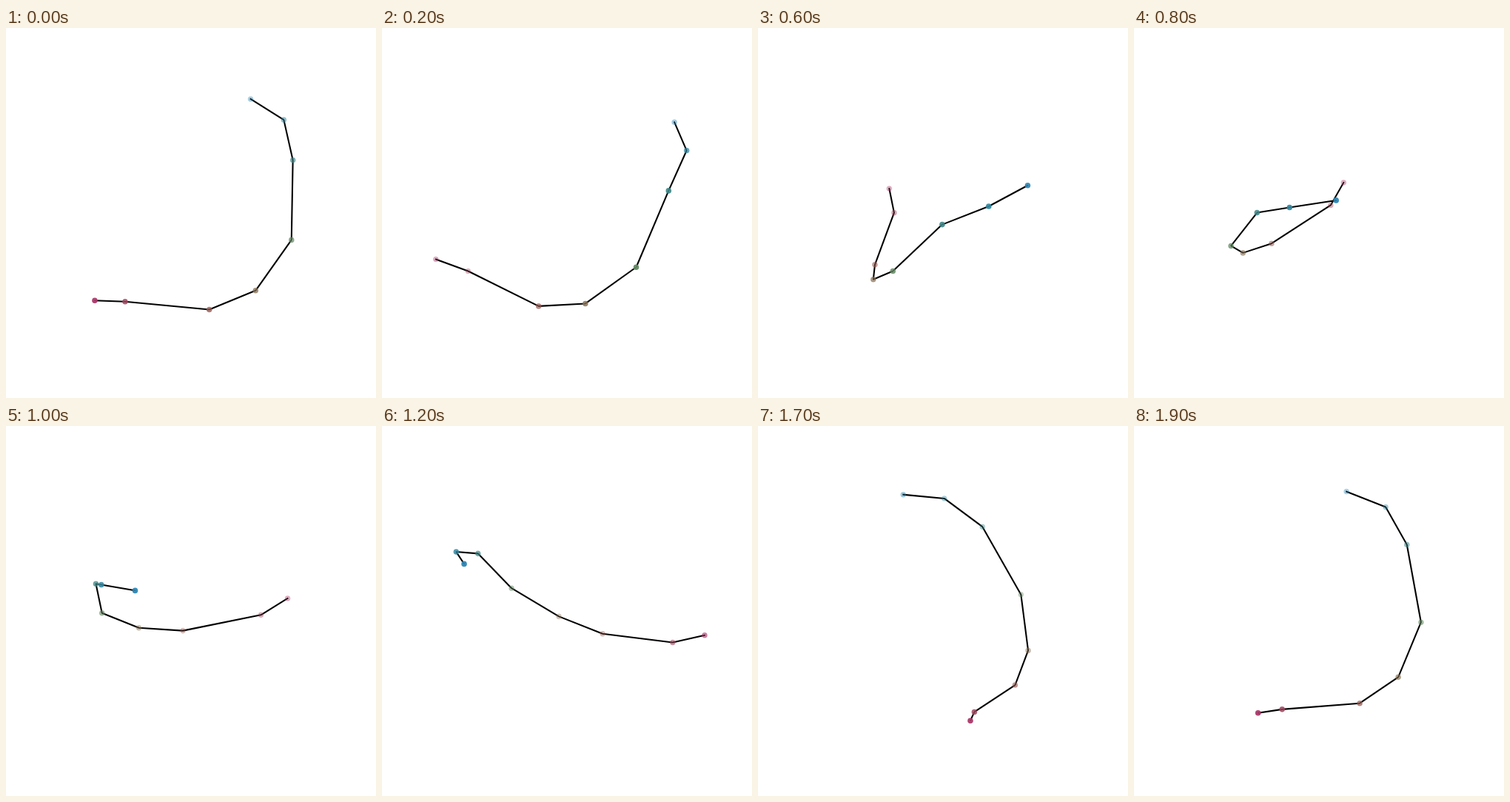
These frames come from a looping animation (500 px wide and 500 px high, 2 s). An HTML page with a canvas:

```html
<!DOCTYPE html>
<html lang="en">
<head>
<meta charset="utf-8">
<title>Rotating chain</title>
<style>
  html, body { margin: 0; width: 100%; height: 100%; overflow: hidden; background: #fff; }
  canvas { display: block; width: 500px; height: 500px; }
</style>
</head>
<body>
<canvas id="stage"></canvas>
<script>
const STEPS = 20, STEP_MS = 100;
const CENTER = { x: 256.25, y: 243.25 };
const EYE_DISTANCE = 2450;
const ELEVATION = Math.PI / 6;
const LINE_WIDTH = 2.08, DOT_RADIUS = 3.1, DOT_EDGE = 1.39;

// Chain nodes: distance toward the viewer, to the right, and up.
const nodes = [
  { front: 131.7, right: -131.7, up: -63.4, color: '#ac386a' },
  { front: 110.8, right: -93.1, up: -78.7, color: '#a04860' },
  { front: 100, right: 18.2, up: -98.4, color: '#9a5c55' },
  { front: 79.4, right: 80.1, up: -81.5, color: '#8a7458' },
  { front: 33.3, right: 128.8, up: -30.3, color: '#648962' },
  { front: -35.5, right: 131.6, up: 54.3, color: '#408788' },
  { front: -93.7, right: 121, up: 85.6, color: '#3388a0' },
  { front: -131.7, right: 76.3, up: 98.5, color: '#2e86b4' }
];

const canvas = document.getElementById('stage');
const ctx = canvas.getContext('2d');
const ratio = window.devicePixelRatio || 1;
canvas.width = canvas.height = 500 * ratio;
ctx.scale(ratio, ratio);
ctx.lineJoin = 'round';
ctx.lineCap = 'square';

function project(node, angle) {
  const cos = Math.cos(angle), sin = Math.sin(angle);
  const front = node.front * cos + node.right * sin;
  const right = node.right * cos - node.front * sin;
  const near = front * Math.cos(ELEVATION) + node.up * Math.sin(ELEVATION);
  const down = front * Math.sin(ELEVATION) - node.up * Math.cos(ELEVATION);
  const scale = EYE_DISTANCE / (EYE_DISTANCE - near);
  return { x: CENTER.x + right * scale, y: CENTER.y + down * scale, near, color: node.color };
}

function drawLine(points) {
  ctx.globalAlpha = 1;
  ctx.strokeStyle = '#000';
  ctx.lineWidth = LINE_WIDTH;
  ctx.beginPath();
  for (const p of points) ctx.lineTo(p.x, p.y);
  ctx.stroke();
}

function drawDot(p, alpha) {
  ctx.globalAlpha = alpha;
  ctx.fillStyle = ctx.strokeStyle = p.color;
  ctx.lineWidth = DOT_EDGE;
  ctx.beginPath();
  ctx.arc(p.x, p.y, DOT_RADIUS, 0, 2 * Math.PI);
  ctx.fill();
  ctx.stroke();
}

function draw(step) {
  const points = nodes.map(node => project(node, step / STEPS * 2 * Math.PI));
  ctx.clearRect(0, 0, 500, 500);
  drawLine(points);

  // Dots fade with distance and are painted back to front.
  points.sort((p, q) => p.near - q.near);
  const far = points[0].near;
  const span = points[points.length - 1].near - far;
  for (const p of points) drawDot(p, 0.3 + 0.6 * (p.near - far) / span);
}

const start = performance.now();
function tick() {
  draw(Math.floor((performance.now() - start) / STEP_MS) % STEPS);
  requestAnimationFrame(tick);
}
tick();
</script>
</body>
</html>
```
